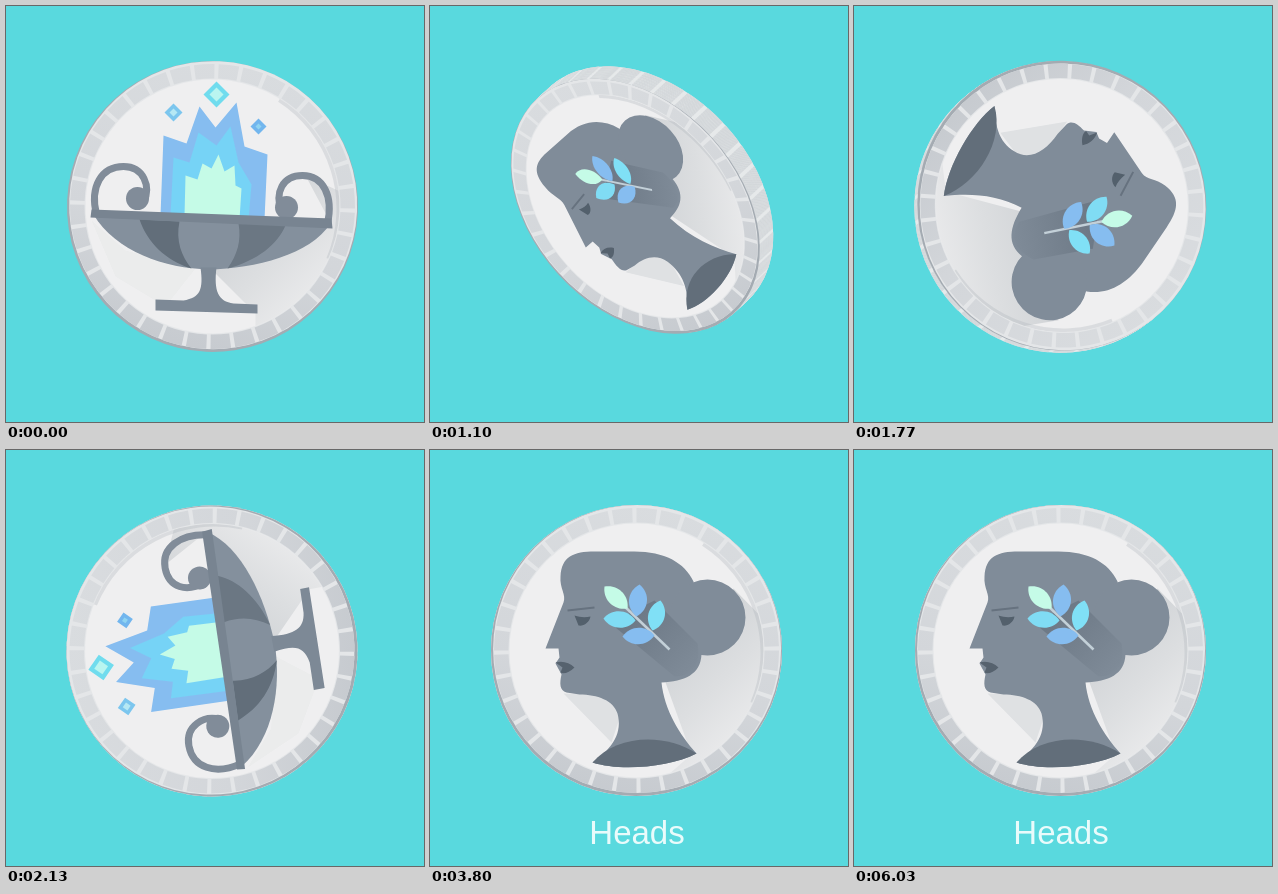
An HTML page with a canvas that plays this animation: 418x416 px, repeating every 6060 ms.

```html
<!DOCTYPE html>
<html lang="en">
<head>
<meta charset="utf-8">
<title>Coin flip</title>
<style>
  html, body { margin: 0; width: 100%; height: 100%; overflow: hidden; background: #59d9de; }
  canvas { position: absolute; left: 0; top: 0; }
  #label {
    position: absolute; left: 0; top: 363px; width: 414px; text-align: center;
    font: 33px/40px "Liberation Sans", Arial, sans-serif; color: #e9fbfb; opacity: 0;
  }
</style>
</head>
<body>
<canvas id="stage" width="418" height="416"></canvas>
<div id="label">Heads</div>
<script>
const ctx = document.getElementById('stage').getContext('2d');
const label = document.getElementById('label');
const LOOP = 6060, R = 145.5, FACE = 127, THICK = 26, BLOCKS = 36;
const CX = 207, CY = 200, DEG = Math.PI / 180;

// Pose table: time, flip, axis angle, spin, centre x, centre y
const POSES = [
  [0, 0, 60, 2.5, 206.5, 200.5],
  [570, 281.5, 74.5, -196, 209, 201],
  [1100, 495, 47, -224, 212, 194],
  [1430, 720, 49, -304.4, 207, 200],
  [2130, 1080, 58, -458, 206, 201],
  [2620, 1260, 60, -600, 206.5, 200.5]
];

const slope = (i, k) => (POSES[i + 1][k] - POSES[i][k]) / (POSES[i + 1][0] - POSES[i][0]);

// Monotone tangent, so values never overshoot a pose
function tangent(i, k) {
  if (i === 0) return slope(0, k);
  if (i === POSES.length - 1) return 0;
  const a = slope(i - 1, k), b = slope(i, k);
  return a * b > 0 ? 2 * a * b / (a + b) : 0;
}

function poseAt(t) {
  const last = POSES.length - 1;
  if (t >= POSES[last][0]) return POSES[last].slice(1);
  let i = 0;
  while (t >= POSES[i + 1][0]) i++;
  const h = POSES[i + 1][0] - POSES[i][0], u = (t - POSES[i][0]) / h;
  const u2 = u * u, u3 = u2 * u;
  return [1, 2, 3, 4, 5].map(k =>
    (2 * u3 - 3 * u2 + 1) * POSES[i][k] + (u3 - 2 * u2 + u) * h * tangent(i, k) +
    (3 * u2 - 2 * u3) * POSES[i + 1][k] + (u3 - u2) * h * tangent(i + 1, k));
}

const shapes = {};
const fill = (d, color) => {
  ctx.fillStyle = color;
  ctx.fill(shapes[d] || (shapes[d] = new Path2D(d)));
};
const line = (d, color, width) => {
  ctx.strokeStyle = color;
  ctx.lineWidth = width;
  ctx.stroke(shapes[d] || (shapes[d] = new Path2D(d)));
};
const disc = (x, y, r, color) => {
  ctx.beginPath();
  ctx.arc(x, y, r, 0, 7);
  ctx.fillStyle = color;
  ctx.fill();
};
const diamond = (x, y, r, color) =>
  fill(`M${x} ${y - r}L${x + r} ${y}L${x} ${y + r}L${x - r} ${y}Z`, color);

function leaf(x1, y1, x2, y2, bulge, color) {
  const dx = x2 - x1, dy = y2 - y1, n = bulge / Math.hypot(dx, dy);
  const p = (u, s) => `${x1 + dx * u - s * dy * n} ${y1 + dy * u + s * dx * n}`;
  fill(`M${x1} ${y1}C${p(.25, 1)} ${p(.75, 1)} ${x2} ${y2}C${p(.75, -1)} ${p(.25, -1)} ${x1} ${y1}Z`, color);
}

function blockRing(inner, outer) {
  const ring = new Path2D(), step = 2 * Math.PI / BLOCKS;
  for (let i = 0; i < BLOCKS; i++) {
    const a = i * step, b = a + step * .83;
    ring.moveTo(inner * Math.cos(a), inner * Math.sin(a));
    ring.arc(0, 0, outer, a, b);
    ring.arc(0, 0, inner, b, a, true);
    ring.closePath();
  }
  return ring;
}
const rimBlocks = blockRing(FACE + 1, 142.5), wallBlocks = blockRing(100, R);

const rimTone = ctx.createLinearGradient(30, -R, -30, R);
rimTone.addColorStop(0, '#d9dcdf');
rimTone.addColorStop(.6, '#d3d6da');
rimTone.addColorStop(1, '#c6cacf');

const shade = ctx.createLinearGradient(220, 210, 320, 310);
shade.addColorStop(0, '#cfd2d5');
shade.addColorStop(.45, '#dcdee0');
shade.addColorStop(1, '#efeff0');

const sprigShade = ctx.createLinearGradient(205, 165, 265, 225);
sprigShade.addColorStop(0, '#6d7986');
sprigShade.addColorStop(1, '#808c99');

function drawTails() {
  fill('M300 169L345 190L345 300L250 345L250 307L206 263L325 216Z', shade);
  fill('M86 214L120 244L190 262L160 300L110 270Z', '#ebecec');

  fill('M155 209L158 129L181 137L194 100L210 121L231 96L239 140L262 148L259 213Z', '#86bdf0');
  fill('M165 209L168 151L184 156L193 126L211 139L225 120L233 156L246 178L243 213Z', '#76d3f6');
  fill('M179 210L180 169L192 173L197 157L206 162L213 148L219 165L229 159L230 179L236 182L234 213Z', '#c5fbe7');
  diamond(211, 88, 13, '#70dcee');
  diamond(211, 88, 7, '#b9f5f0');
  diamond(168, 106, 9, '#7cc6ee');
  diamond(168, 106, 4, '#b5e8f4');
  diamond(253, 120, 8, '#72b6ee');
  diamond(253, 120, 3, '#8fd4f2');

  const metal = '#818c99';
  line('M91 208C84 180 96 160 118 160C138 160 146 180 138 196', metal, 7);
  line('M322 217C328 190 318 169 297 169C277 169 269 186 276 205', metal, 7);
  disc(132, 192, 11.5, metal);
  disc(281, 201, 11.5, metal);

  fill('M88 208C110 245 160 262 203 263C250 262 305 248 325 217Z', '#84909d');
  fill('M134 213L174 215C170 234 176 250 186 262C160 254 142 236 134 213Z', '#626e7a');
  fill('M233 217L280 219C272 238 252 254 222 262C232 248 236 234 233 217Z', '#6b7783');
  fill('M86 203L326 212L327 222L85 211Z', '#788491');
  fill('M150 293L178 294C195 291 198 283 195 261L211 261C208 285 213 295 228 297L252 298L252 307L150 304Z', '#7d8996');
}

function drawHeads() {
  fill('M304 138L345 180L345 310L215 345L262 304L236 232L270 204Z', shade);
  fill('M134 243L182 292L192 262L186 244Z', '#dfe1e3');

  const skin = '#808c99';
  fill('M131 126C132 106 144 101 165 101L205 101C235 101 255 112 264 131L272 204' +
       'C271 224 255 231 232 232C235 260 250 284 267 303C240 317 190 321 163 312' +
       'C184 297 193 282 188 263C184 250 168 244 150 244L137 242C130 240 130 233 132 224' +
       'L126 213L130 207L129 198L116 198L134 152C137 144 130 138 131 126Z', skin);
  disc(278, 167, 38, skin);
  fill('M180 172L225 150L268 193C272 214 262 226 245 226Z', sprigShade);
  fill('M163 312C186 284 236 282 267 303C240 317 190 321 163 312Z', '#626e7a');
  line('M138 160L165 157', '#66727f', 2);
  fill('M145 165C151 167 156 167 161 166C160 172 154 176 149 175Z', '#53606c');
  fill('M126 212C133 210 140 212 145 217C140 222 134 224 131 222L133 217Z', '#56626e');

  line('M192 153L240 199', '#c3d0d8', 2.5);
  leaf(175, 136, 198, 158, 11, '#c5fbe7');
  leaf(210, 134, 207, 166, 12, '#86bdf0');
  leaf(174, 168, 206, 170, 11, '#80dcf4');
  leaf(193, 186, 225, 185, 11, '#86bdf0');
  leaf(231, 150, 223, 180, 11, '#80e0f6');
}

function drawFace(tails) {
  // The offset light disc leaves a dark crescent along the bottom edge
  disc(0, 0, R, '#a4abb2');
  disc(.6, -1.4, R - 1.5, '#e4e6e8');
  ctx.fillStyle = rimTone;
  ctx.fill(rimBlocks);
  disc(0, 0, FACE, '#efeff0');
  ctx.save();
  ctx.beginPath();
  ctx.arc(0, 0, FACE, 0, 7);
  ctx.clip();
  if (tails) ctx.rotate(-2.5 * DEG);
  ctx.translate(-CX, -CY);
  if (tails) drawTails(); else drawHeads();
  ctx.beginPath();
  ctx.arc(CX - 3, CY + 2, FACE + 2, -1, .4);
  ctx.strokeStyle = 'rgba(170,176,182,.3)';
  ctx.lineWidth = 4;
  ctx.stroke();
  ctx.restore();
}

function drawCoin(t) {
  const [flip, axis, spin, x, y] = poseAt(t);
  const sin = Math.sin(flip * DEG);
  let cos = Math.cos(flip * DEG);
  if (Math.abs(cos) < .01) cos = cos < 0 ? -.01 : .01;
  const tails = cos > 0, side = tails ? 1 : -1;

  const layer = (depth, paint) => {
    ctx.save();
    ctx.translate(x, y);
    ctx.rotate(axis * DEG);
    ctx.translate(0, -sin * depth * side * THICK / 2);
    ctx.scale(1, cos);
    ctx.rotate((spin - axis) * DEG);
    if (!tails) ctx.scale(1, -1);
    paint();
    ctx.restore();
  };

  const steps = Math.ceil(THICK * Math.abs(sin));
  for (let i = 0; i < steps; i++) {
    layer(-1 + 2 * i / steps, () => {
      disc(0, 0, R, '#e6e9ea');
      ctx.fillStyle = '#d3d7da';
      ctx.fill(wallBlocks);
    });
  }
  layer(1, () => drawFace(tails));
}

let start;
function frame(now) {
  if (start === undefined) start = now;
  const t = (now - start) % LOOP;
  ctx.clearRect(0, 0, 418, 416);
  drawCoin(t);
  label.style.opacity = Math.min(1, Math.max(0, (t - 2650) / 400));
  requestAnimationFrame(frame);
}
requestAnimationFrame(frame);
</script>
</body>
</html>
```
